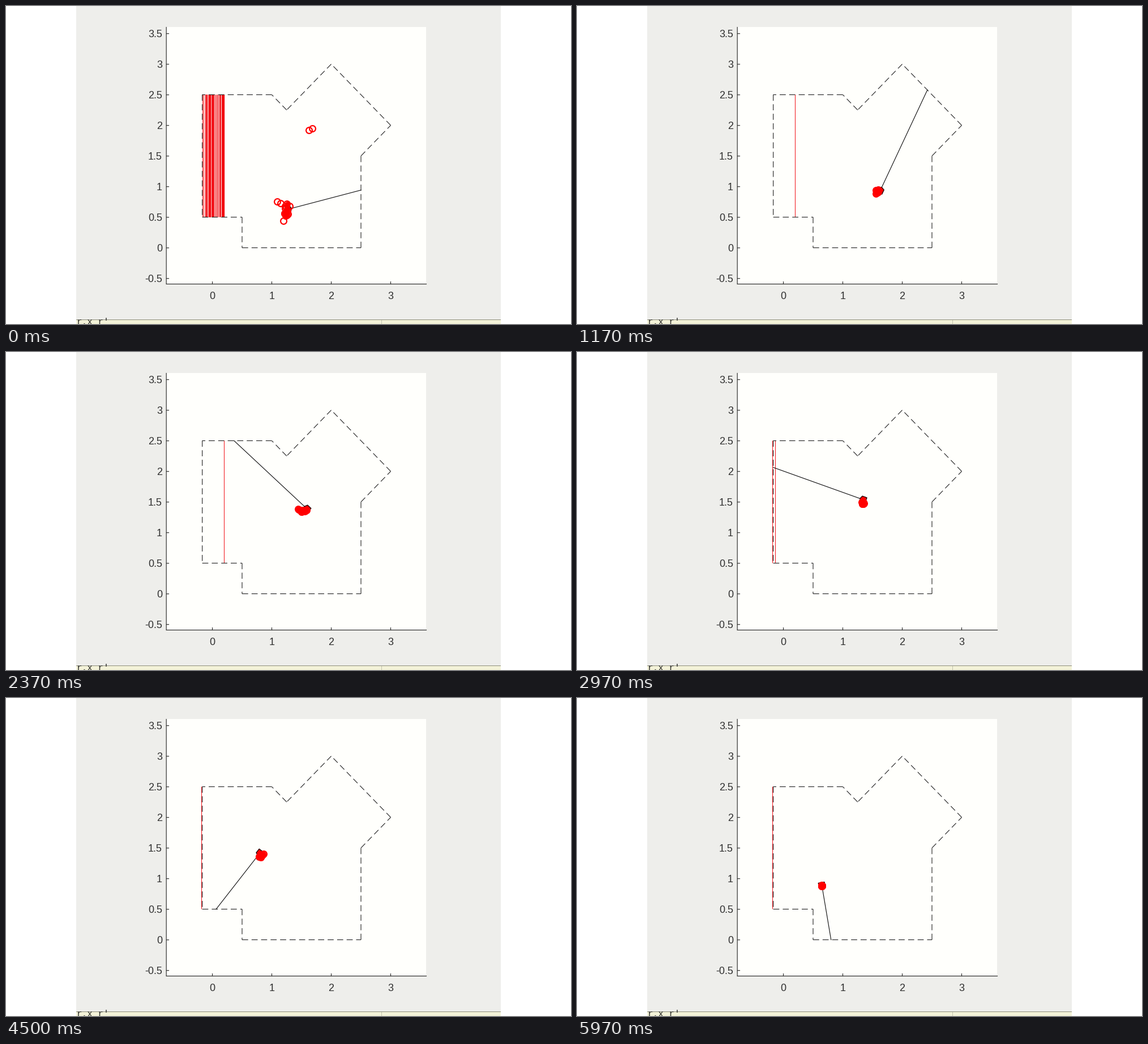
A matplotlib script for the animation above (6.01 s loop, 998 by 561 pixels).

```python
import math

import numpy as np
import matplotlib.pyplot as plt
from matplotlib.animation import FuncAnimation
from matplotlib.collections import LineCollection
from matplotlib.patches import Polygon, Rectangle

W, H, DPI = 998, 561, 64
PT = 72 / DPI              # points per pixel
LOOP, TICK = 6010, 10      # ms
INK, RED = "#262626", "#ff0000"
SPEED = 44                 # robot, pixels per second
RINGS = 14

# step, time, robot x, y, heading, particle cloud from (dx, dy) to (dx, dy)
KEYS = np.array([
    (0,     0,    498, 358, 14.7,   -1, -9, -4, 14),
    (11,    670,  524, 341, 43.8,    0,  2, -2, 9),
    (24,    1670, 540, 302, 89.6,  -10, -4, -10, 0),
    (35,    2370, 531, 276, 137,   -14,  1, -2, 5),
    (44,    2970, 505, 260, 160.3,  -1,  4,  0, 8),
    (65,    4500, 448, 273, 232,    -1,  7,  5, 3),
    (79,    5970, 432, 330, 279.6,   0,  0,  0, 1)])
KEY_MS = KEYS[:, 1]
STRAYS = [(479, 345), (485, 348), (490, 379), (535, 219), (541, 216)]

STEP_MS = np.interp(np.arange(80), KEYS[:, 0], KEY_MS)
STEP_MS = np.round(np.round(STEP_MS * 0.03) * 10 / 3) * 10

ROOM = np.array([(0.5, 0), (2.5, 0), (2.5, 1.5), (3, 2), (2, 3), (1.25, 2.25),
                 (1, 2.5), (-0.17, 2.5), (-0.17, 0.5), (0.5, 0.5), (0.5, 0)])
WALLS = ROOM * (105, -108) + (364, 426)
SIDES = list(zip(WALLS[:-1], WALLS[1:]))
BODY = np.array([(-5, -5.5), (3.5, -5.5), (6, 0), (3.5, 5.5), (-5, 5.5)])

rng = np.random.default_rng(4)
SCATTER = rng.normal(size=(RINGS, 2)).clip(-1.6, 1.6)
DOORS = np.r_[385, rng.uniform(344.6, 385.4, 40)]


def heading(degrees):
    h = math.radians(degrees)
    return np.array([math.cos(h), -math.sin(h)])


def locate(t):
    """Robot position: Hermite curve whose tangents follow the heading."""
    i = min(np.searchsorted(KEY_MS, t, "right") - 1, len(KEYS) - 2)
    a, b = KEYS[i], KEYS[i + 1]
    span = b[1] - a[1]
    u = (t - a[1]) / span
    pull = SPEED * span / 1000
    ease = u * u * (3 - 2 * u)
    pos = (a[2:4] * (1 - ease) + b[2:4] * ease
           + u * (1 - u) ** 2 * pull * heading(a[4])
           - u * u * (1 - u) * pull * heading(b[4]))
    return pos, u


def cast(pos, way):
    """Nearest point where the beam meets a wall."""
    best = W
    for p, q in SIDES:
        e, d = q - p, p - pos
        det = way[1] * e[0] - way[0] * e[1]
        if abs(det) < 1e-9:
            continue
        reach = (d[1] * e[0] - d[0] * e[1]) / det
        along = (way[0] * d[1] - way[1] * d[0]) / det
        if reach > 0 and 0 <= along <= 1:
            best = min(best, reach)
    return pos + best * way


def door_xs(step, t):
    """Guesses of the left wall thin out, then slide to the true place."""
    if t < 2600:
        return DOORS[:1 + int(40 * 0.6 ** step)]
    slide = [np.interp(t, (2600, 2900), (385, 345)),
             np.interp(t, (2600, 2960), (385, 350))]
    return slide if t < 3000 else slide[:1]


def pose(step):
    t = STEP_MS[step]
    pos, u = locate(t)
    angle, *ends = [np.interp(t, KEY_MS, column) for column in KEYS[:, 4:].T]
    way = heading(angle)
    side = np.array([-way[1], way[0]])
    core = pos + np.reshape(ends, (2, 2))
    a, b = core
    spread = 0.4 + 0.09 * np.hypot(*(b - a))
    noise = np.random.default_rng(step).normal(size=(RINGS, 2))
    cloud = (a + (b - a) * np.linspace(0, 1, RINGS)[:, None]
             + SCATTER * spread + noise * math.sin(math.pi * u))
    if step == 0:
        cloud = np.vstack([cloud, STRAYS])
    doors = [[(x, 156), (x, 372)] for x in door_xs(step, t)]
    body = pos + BODY[:, :1] * way + BODY[:, 1:] * side
    return body, np.array([pos, cast(pos, way)]), cloud, core, doors


POSES = [pose(s) for s in range(len(STEP_MS))]

fig = plt.figure(figsize=(W / DPI, H / DPI), dpi=DPI, facecolor="white")
ax = fig.add_axes([0, 0, 1, 1])
ax.set_axis_off()
ax.set_xlim(-0.5, W - 0.5)
ax.set_ylim(H - 0.5, -0.5)


def box(x, y, w, h, color):
    ax.add_patch(Rectangle((x - 0.5, y - 0.5), w, h, fc=color, lw=0, zorder=0))


def line(xs, ys, color=INK, width=1.15, **kw):
    return ax.plot(xs, ys, color=color, lw=width * PT, snap=False, **kw)[0]


def label(x, y, text, ha):
    ax.text(x, y + 6.3, text, color="#303030", family="Liberation Sans",
            size=18 * PT, ha=ha, va="baseline")


box(124, 0, 750, 553, "#eeeeeb")
box(283, 37, 459, 453, "#fffffc")
box(124, 553, 750, 8, "#f3f2d8")
box(124, 553, 750, 1, "#8e8e7c")
box(663, 554, 1, 7, "#c4c4b0")
ax.text(123.5, 561.5, "r.x_r'", family="Liberation Mono", size=16 * PT,
        color="#333330", va="baseline")

line([282.7, 282.7], [37, 490])
line([283, 742], [490, 490])
for v in np.arange(-0.5, 3.6, 0.5):
    y = 426.2 - 108 * v
    line([283, 287], [y, y])
    label(275.5, y + 0.3, f"{v:g}", "right")
for v in range(4):
    x = 364 + 105 * v
    line([x, x], [486, 490])
    label(x, 510.3, str(v), "center")

for p, q in SIDES:
    line(*np.array([p, q]).T, zorder=3, ls=(0, (9.3, 5.3)), dash_capstyle="butt")

doors = LineCollection([], colors=[(0.95, 0, 0.03, 0.85)], linewidths=1.15 * PT,
                       zorder=2)
ax.add_collection(doors)
beam = line([], [], "#111111", zorder=4)
robot = Polygon(BODY, closed=True, fc=RED, ec="#180000", lw=1.3 * PT, zorder=5)
ax.add_patch(robot)
core = line([], [], RED, 9, solid_capstyle="round", zorder=6)
rings = line([], [], RED, ls="none", marker="o", ms=10.8 * PT, mfc="none",
             mew=2.2 * PT, zorder=7)


def show(n):
    step = np.searchsorted(STEP_MS, n * TICK, "right") - 1
    body, ray, cloud, spine, lines = POSES[step]
    robot.set_xy(body)
    beam.set_data(*ray.T)
    rings.set_data(*cloud.T)
    core.set_data(*spine.T)
    doors.set_segments(lines)
    return doors, beam, robot, core, rings


anim = FuncAnimation(fig, show, frames=LOOP // TICK, interval=TICK,
                     init_func=lambda: show(0), repeat=True, repeat_delay=0)
plt.show()
```
